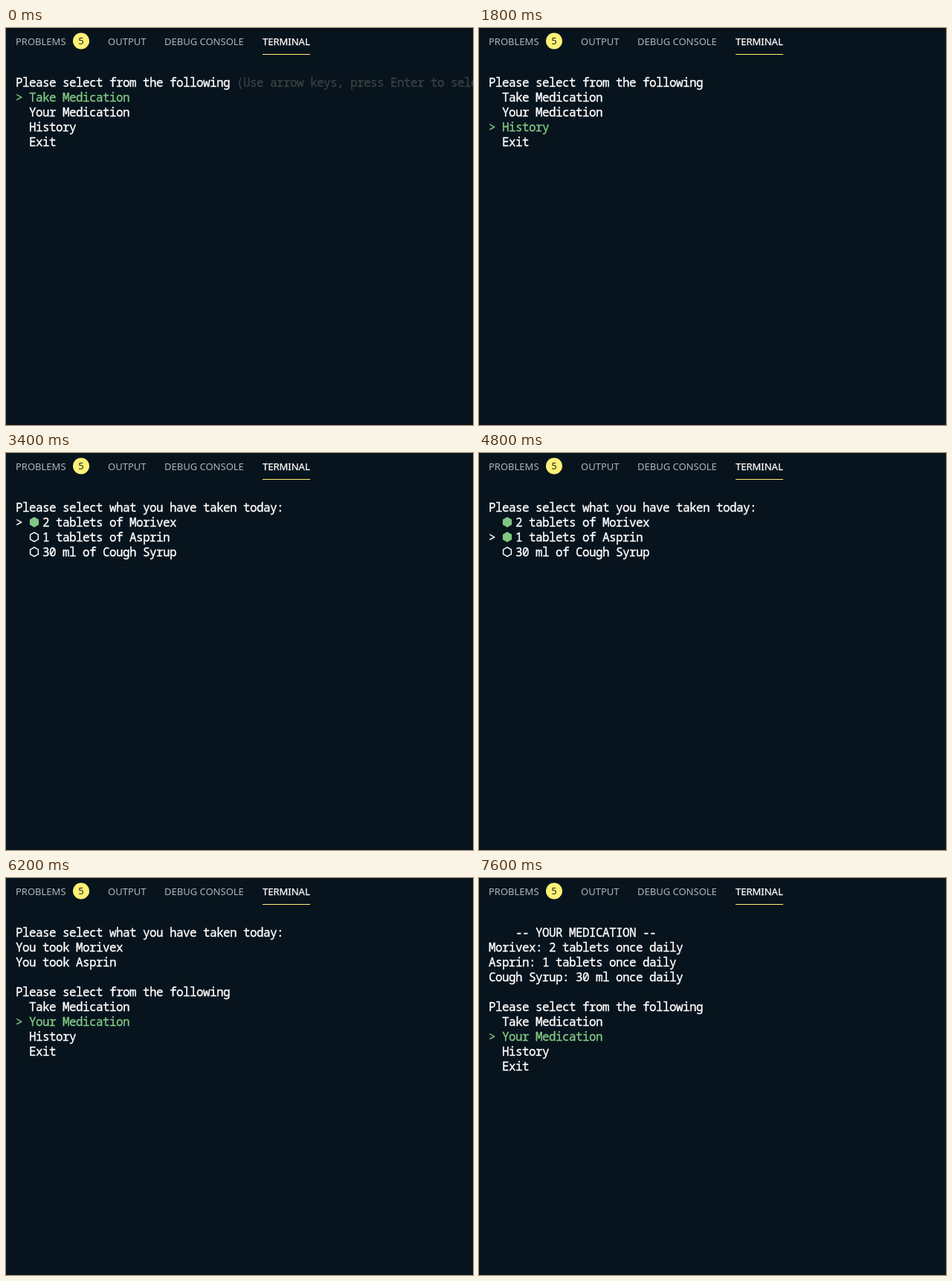
Animation of 628 by 534 pixels, one loop 8000 ms. Source, as an HTML page:

```html
<!DOCTYPE html>
<html lang="en">
<head>
<meta charset="utf-8">
<title>Terminal menu</title>
<style>
  html, body { margin: 0; width: 100%; height: 100%; overflow: hidden; background: #08141d; }
  svg { display: block; width: 100%; height: 100%; }
  .tabs { font: 13px "Noto Sans", "Open Sans", sans-serif; fill: #adb5ba; }
  .tabs .active { fill: #fff; stroke: #fff; stroke-width: 0.25; }
  .tabs .count { fill: #1c2226; text-anchor: middle; }
  .screen text {
    font: 16px "Noto Sans Mono", "DejaVu Sans Mono", monospace;
    letter-spacing: -0.6px; white-space: pre; font-variant-ligatures: none;
    stroke-width: 0.35;
  }
</style>
</head>
<body>
<svg viewBox="0 0 628 534">
  <rect width="628" height="534" fill="#08141d"/>
  <g class="tabs">
    <text x="13" y="23">PROBLEMS</text>
    <circle cx="101" cy="17.5" r="11" fill="#fff176"/>
    <text class="count" x="101" y="22">5</text>
    <text x="137" y="23">OUTPUT</text>
    <text x="213" y="23">DEBUG CONSOLE</text>
    <text class="active" x="345" y="23">TERMINAL</text>
    <rect x="345" y="35" width="64" height="1" fill="#fff176"/>
  </g>
  <g class="screen" id="screen"></g>
</svg>
<script>
const LOOP = 8000;
const LEFT = 13, CELL = 9, TOP = 79, ROW = 20;
const WHITE = '#ffffff', GREEN = '#81c784', DIM = '#3a3f42';
const screen = document.getElementById('screen');

function add(tag, attrs, content = '') {
  const el = document.createElementNS('http://www.w3.org/2000/svg', tag);
  for (const key in attrs) el.setAttribute(key, attrs[key]);
  el.textContent = content;
  screen.appendChild(el);
}

function write(row, col, content, color = WHITE) {
  add('text', { x: LEFT + col * CELL, y: TOP + row * ROW, fill: color, stroke: color }, content);
}

function prompt(row, question, hint) {
  write(row, 0, question);
  if (hint) write(row, question.length + 1, hint, DIM);
}

function hexagon(row, filled) {
  const cx = 38, cy = TOP + row * ROW - 6, r = filled ? 7 : 6.2;
  const points = Array.from({ length: 6 }, (_, i) => {
    const a = (i - 0.5) * Math.PI / 3;
    return (cx + r * Math.cos(a)).toFixed(2) + ',' + (cy + r * Math.sin(a)).toFixed(2);
  }).join(' ');
  add('polygon', filled
    ? { points, fill: GREEN }
    : { points, fill: 'none', stroke: WHITE, 'stroke-width': 1.5 });
}

const drugs = [
  { name: 'Morivex', dose: '2 tablets' },
  { name: 'Asprin', dose: '1 tablets' },
  { name: 'Cough Syrup', dose: '30 ml' }
];
const options = ['Take Medication', 'Your Medication', 'History', 'Exit'];
const takenPrompt = 'Please select what you have taken today:';

function menu(row, active, hint) {
  prompt(row, 'Please select from the following', hint && '(Use arrow keys, press Enter to select)');
  options.forEach((label, i) => {
    const on = i === active, y = row + 1 + i;
    if (on) write(y, 0, '>', GREEN);
    write(y, 2, label, on ? GREEN : WHITE);
  });
}

function checklist(active, checked, hint) {
  prompt(0, takenPrompt, hint && '(Use arrow keys, press Space to select and Enter to finish)');
  drugs.forEach(({ name, dose }, i) => {
    if (i === active) write(i + 1, 0, '>');
    hexagon(i + 1, i < checked);
    write(i + 1, 4, `${dose} of ${name}`);
  });
}

function taken(active, hint) {
  write(0, 0, takenPrompt);
  drugs.slice(0, 2).forEach(({ name }, i) => write(i + 1, 0, `You took ${name}`));
  menu(4, active, hint);
}

function overview(active, hint) {
  write(0, 4, '-- YOUR MEDICATION --');
  drugs.forEach(({ name, dose }, i) => write(i + 1, 0, `${name}: ${dose} once daily`));
  menu(5, active, hint);
}

const steps = [
  [0, () => menu(0, 0, true)],
  [900, () => menu(0, 1)],
  [1200, () => menu(0, 2)],
  [1500, () => menu(0, 3)],
  [1800, () => menu(0, 2)],
  [2100, () => menu(0, 1)],
  [2400, () => menu(0, 0)],
  [2700, () => checklist(0, 0, true)],
  [3400, () => checklist(0, 1)],
  [4100, () => checklist(1, 1)],
  [4800, () => checklist(1, 2)],
  [5500, () => taken(0, true)],
  [6200, () => taken(1)],
  [6900, () => overview(0, true)],
  [7600, () => overview(1)]
];

let shown = null;
function render(time) {
  const step = steps.filter(([at]) => at <= time).pop();
  if (step === shown) return;
  shown = step;
  screen.replaceChildren();
  step[1]();
}

const start = performance.now();
function tick() {
  render((performance.now() - start) % LOOP);
  requestAnimationFrame(tick);
}
tick();
</script>
</body>
</html>
```
